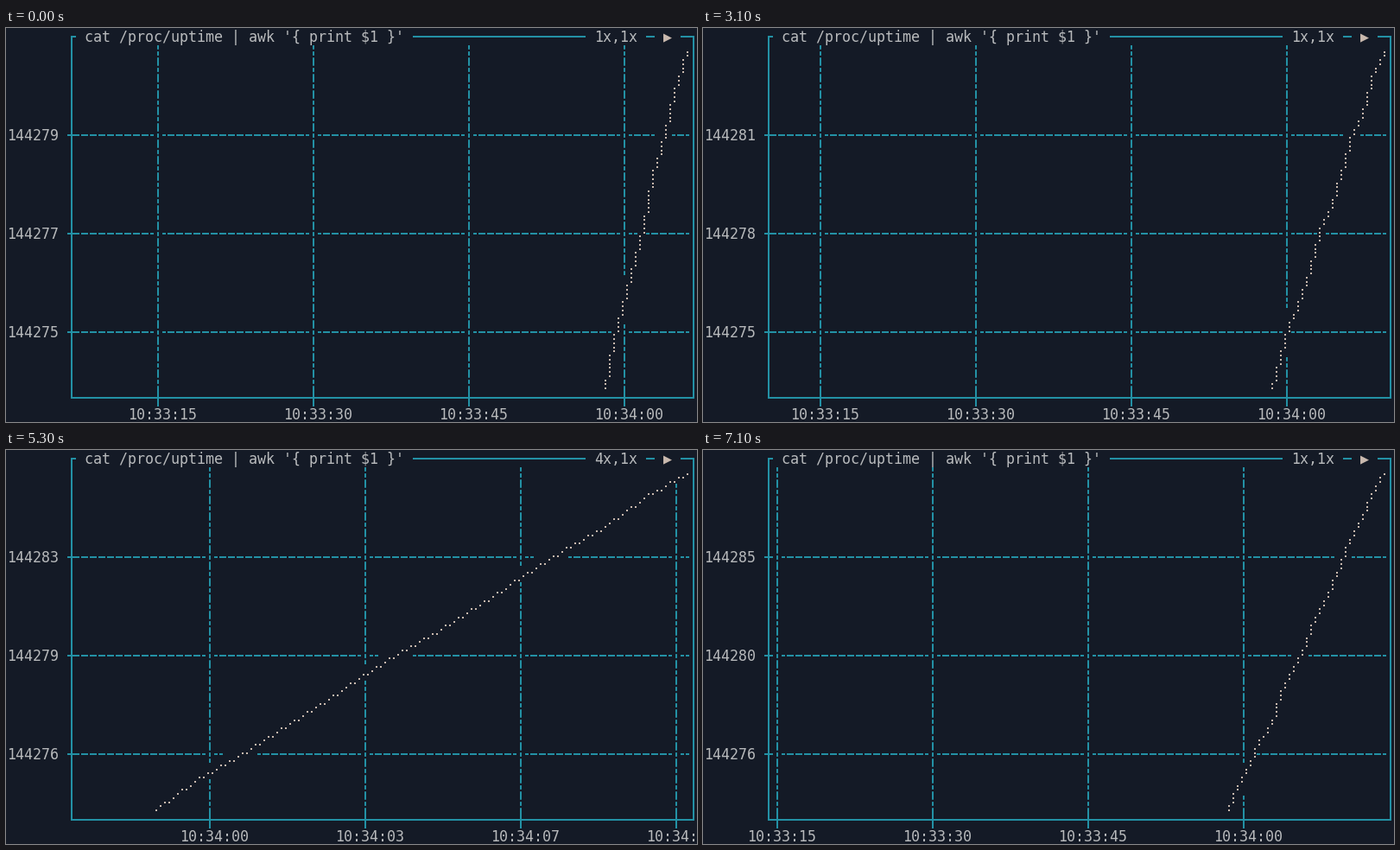
These frames come from a looping animation (800 px wide and 456 px high, 8 s). A matplotlib script:

```python
import math

import matplotlib.pyplot as plt
import numpy as np
from matplotlib.animation import FuncAnimation
from matplotlib.collections import LineCollection

WIDTH, HEIGHT, DPI = 800, 456, 64
PT = 72 / DPI
CELL_W, CELL_H = 10, 19
LEFT, RIGHT, BOTTOM = 7, 79, 22          # border columns and row
GRID_ROWS = (6, 12, 18)
BACK, CYAN, TEXT, DOTS = "#141a26", "#2391a5", "#b8babc", "#c9b9ae"

STEP_MS, LOOP_MS = 100, 8000
SAMPLE_S = 0.984                         # seconds between samples
FIRST_S = -1.24                          # first sample, relative to 10:34:00
CLOCK_ZERO = 10 * 3600 + 34 * 60
UPTIME = 144273.21
JITTER = {1: 0.08, 3: 0.02, 4: -0.08, 5: 0.08}

# start in ms, newest sample index, horizontal zoom
STATES = [(0, 8, 1), (900, 9, 1), (1900, 10, 1), (3100, 11, 1),
          (4000, 12, 1), (4900, 12, 2), (5000, 13, 2), (5300, 13, 4),
          (5900, 13, 2), (6000, 14, 2), (6100, 14, 1), (7100, 15, 1)]


def cell_x(col):
    return CELL_W * col + 1


def cell_y(row):
    return CELL_H * row + 1


def mid_x(col):
    return cell_x(col) + 5


def mid_y(row):
    return cell_y(row) + 9


def hline(x0, x1, y):
    return [(x0, y), (x1, y)]


def vline(x, y0, y1):
    return [(x, y0), (x, y1)]


def border():
    x0, x1 = mid_x(LEFT), mid_x(RIGHT)
    y0, y1 = mid_y(0), mid_y(BOTTOM)
    top = [(x0 - 1, cell_x(8)), (cell_x(47), cell_x(67)),
           (cell_x(74), cell_x(75)), (cell_x(78), x1 + 1)]
    lines = [hline(a, b, y0) for a, b in top]
    lines += [hline(x0 - 1, x1 + 1, y1),
              vline(x0, y0 - 1, y1 + 1), vline(x1, y0 - 1, y1 + 1)]
    lines += [hline(cell_x(LEFT), cell_x(LEFT + 1), mid_y(r)) for r in GRID_ROWS]
    return lines


def trace(newest, zoom):
    """Braille dots of the plotted line as a set of (sub-column, sub-row)."""
    index = np.arange(newest + 1)
    value = index * SAMPLE_S + [JITTER.get(i, 0) for i in index]
    xs = 157 - np.ceil((newest - index) * SAMPLE_S * 2.4 * zoom - 1e-9)
    ys = 83 - np.round(82 * value / value[-1])
    dots = set()
    for x0, y0, x1, y1 in zip(xs, ys, xs[1:], ys[1:]):
        count = int(max(abs(x1 - x0), abs(y1 - y0))) + 1
        for x, y in zip(np.linspace(x0, x1, count), np.linspace(y0, y1, count)):
            dots.add((math.floor(x + 0.5), math.floor(y + 0.5)))
    return dots


def dot_segment(sub_x, sub_y):
    x = cell_x(sub_x // 2) + (3, 8)[sub_x % 2]
    y = cell_y(sub_y // 4 + 1) + (3, 8, 12, 17)[sub_y % 4]
    return hline(x - 1, x + 1, y)


def time_ticks(newest, zoom):
    """Column and clock text of every vertical grid line."""
    now = newest * SAMPLE_S + FIRST_S
    zero = math.floor((790 - 12 * zoom * now) / CELL_W)
    ticks = []
    for k in range(-4, 5):
        col = zero + 18 * k
        if LEFT < col < RIGHT:
            t = math.floor(CLOCK_ZERO + 15 / zoom * k)
            clock = f"{t // 3600:02}:{t // 60 % 60:02}:{t % 60:02}"
            ticks.append((col, clock[:80 - (col - 3)]))
    return ticks


def grid(columns, covered):
    lines = []
    dash = CELL_H / 8
    for col in columns:
        x = mid_x(col)
        lines.append(vline(x, cell_y(BOTTOM), cell_y(BOTTOM + 1)))
        for row in range(1, BOTTOM):
            if (col, row) not in covered:
                y = cell_y(row)
                lines += [vline(x, y + 3 * i * dash, y + (3 * i + 2) * dash)
                          for i in range(3)]
    for row in GRID_ROWS:
        for col in range(LEFT + 1, RIGHT):
            if col not in columns and (col, row) not in covered:
                x = cell_x(col)
                lines += [hline(x + a, x + a + 4, mid_y(row)) for a in (0, 6)]
    return lines


fig = plt.figure(figsize=(WIDTH / DPI, HEIGHT / DPI), dpi=DPI, facecolor=BACK)
ax = fig.add_axes([0, 0, 1, 1])
ax.set_xlim(0, WIDTH)
ax.set_ylim(HEIGHT, 0)
ax.axis("off")


def add_lines(color, segments=()):
    lines = LineCollection(segments, colors=color, linewidths=2 * PT, capstyle="butt")
    lines.set_snap(False)
    return ax.add_collection(lines, autolim=False)


def add_text(col, row, text="", color=TEXT):
    return ax.text(cell_x(col), cell_y(row) + 15, text, color=color,
                   family="DejaVu Sans Mono", size=16.6 * PT,
                   ha="left", va="baseline", parse_math=False)


add_lines(CYAN, border())
grid_lines = add_lines(CYAN)
dot_lines = add_lines(DOTS)
add_text(9, 0, "cat /proc/uptime | awk '{ print $1 }'")
add_text(76, 0, "▶", DOTS)
zoom_text = add_text(68, 0)
value_texts = [add_text(0, row) for row in GRID_ROWS]
time_texts = [add_text(0, 23) for _ in range(5)]


def update(frame):
    now = frame * STEP_MS
    _, newest, zoom = [s for s in STATES if s[0] <= now][-1]

    dots = trace(newest, zoom)
    covered = {(x // 2, y // 4 + 1) for x, y in dots}
    ticks = time_ticks(newest, zoom)
    dot_lines.set_segments([dot_segment(x, y) for x, y in dots])
    grid_lines.set_segments(grid([col for col, _ in ticks], covered))

    zoom_text.set_text(f"{zoom}x,1x")
    for label, part in zip(value_texts, (0.80, 0.52, 0.24)):
        label.set_text(str(math.floor(UPTIME + part * newest * SAMPLE_S)))
    for i, label in enumerate(time_texts):
        col, clock = ticks[i] if i < len(ticks) else (0, "")
        label.set_x(cell_x(col - 3))
        label.set_text(clock)
    return [grid_lines, dot_lines, zoom_text, *value_texts, *time_texts]


anim = FuncAnimation(fig, update, frames=LOOP_MS // STEP_MS, interval=STEP_MS,
                     repeat=True, repeat_delay=0, blit=False)
plt.show()
```
